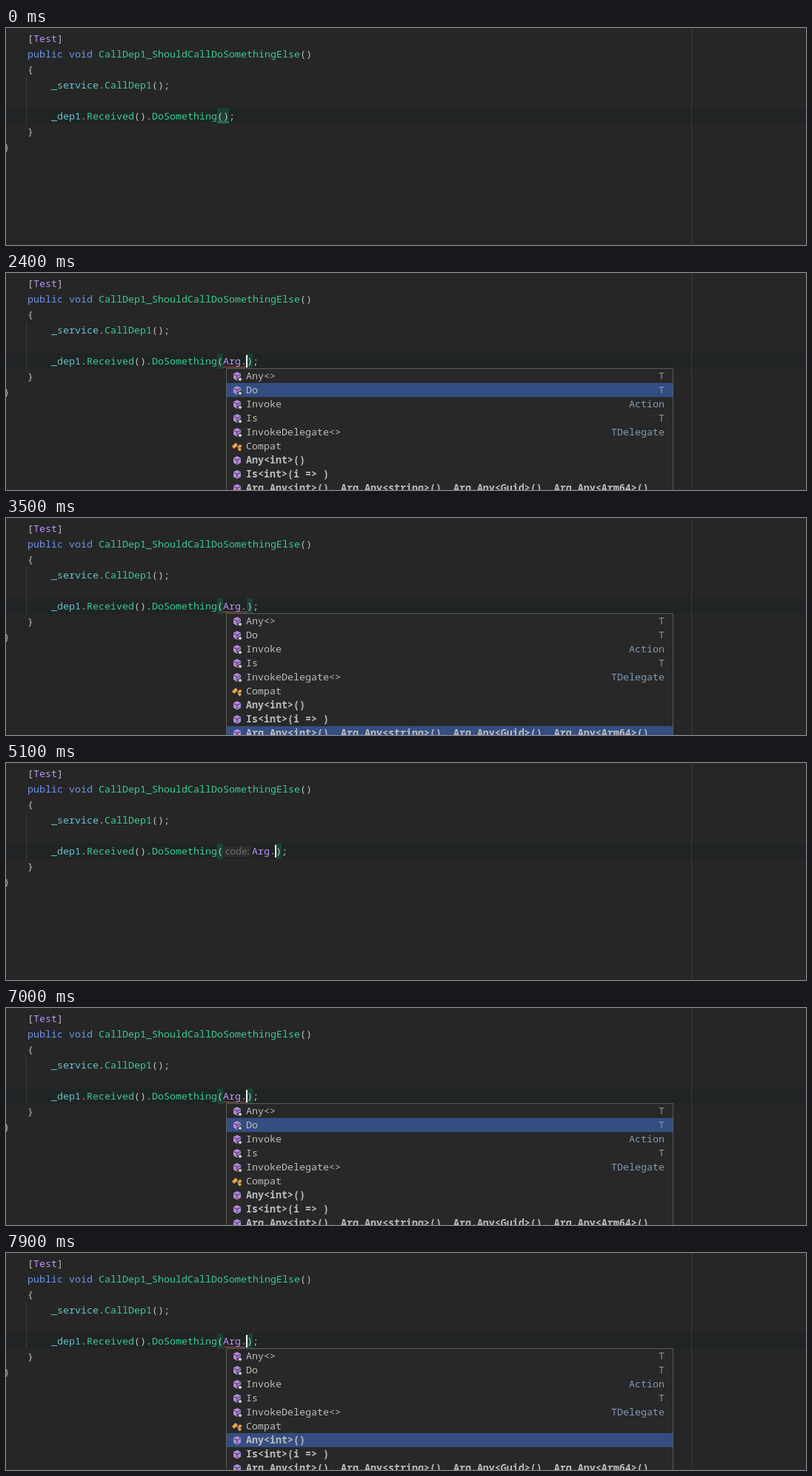
Write an HTML page with a canvas that moves like this. It is 1080 by 294 pixels and loops after 8 s.

```html
<!DOCTYPE html>
<html lang="en">
<head>
<meta charset="utf-8">
<title>Code completion</title>
<style>
  html, body { margin: 0; width: 100%; height: 100%; overflow: hidden; background: #262626; }
  canvas { display: block; }
</style>
</head>
<body>
<canvas id="stage" width="1080" height="294"></canvas>
<script>
const ctx = document.getElementById('stage').getContext('2d');
const LOOP = 8000, CELL = 8, ROW = 19;
const MONO = '13.333px "Noto Sans Mono", "DejaVu Sans Mono", monospace';
const HINT = '13px "Open Sans", sans-serif';
const C = {
  text: '#bdbdbd', key: '#6c95eb', method: '#39cc8f', type: '#c191ff', field: '#66c3cc',
  match: '#d7b56d', detail: '#7f9ab8', orange: '#f0a44b', blue: '#5aa9f0', purple: '#b389d9'
};

const CALLS = '#code:Arg.Any<int>(), #name:Arg.Any<string>(), #id:Arg.Any<Guid>(), #architecture:Arg.Any<Arm64>()';
const CALLS_BARE = CALLS.replace(/#\w+:/g, '');

// Each entry: icon kind, label, detail
const MEMBERS = [
  ['method+', 'Any<>', 'T'], ['method+', 'Do', 'T'], ['method+', 'Invoke', 'Action'],
  ['method+', 'Is', 'T'], ['method+', 'InvokeDelegate<>', 'TDelegate'], ['class', 'Compat'],
  ['method', 'Any<int>()'], ['method', 'Is<int>(i => )'], ['method', CALLS_BARE]
];
const TYPES = {
  A: 'class+ Arg,abstract Array,class Action,class Attribute,struct ArgIterator,class Activator,class AppDomain,class AppContext,class ArgumentException',
  Ar: 'class+ Arg,abstract Array,struct ArgIterator,class ArgumentException,class ArithmeticException,abstract ArmBase,struct ArraySegment<>,class ArgumentNullException,class ArrayTypeMismatchException',
  Arg: 'class+ Arg,struct ArgIterator,class ArgumentException,class ArgumentNullException,class ArgumentOutOfRangeException,class InvalidEnumArgumentException,class DuplicateWaitObjectException,class CultureNotFoundException,class DecoderFallbackException'
};

// Value of the last [time, value] pair already reached
const step = (t, ...pairs) => pairs.filter(p => p[0] <= t).pop()[1];
const within = (t, ...spans) => spans.some(([a, b]) => t >= a && t < b);

function box(x, y, w, h, color) {
  ctx.fillStyle = color;
  ctx.fillRect(x, y, w, h);
}

function write(str, x, y, color = C.text, font = MONO) {
  ctx.font = font;
  ctx.fillStyle = color;
  ctx.fillText(str, x, y);
}

function shape(color, ...points) {
  ctx.fillStyle = color;
  ctx.beginPath();
  points.forEach(([x, y]) => ctx.lineTo(x, y));
  ctx.fill();
}

function stroke(color, ...points) {
  ctx.strokeStyle = color;
  ctx.lineWidth = 1;
  ctx.beginPath();
  points.forEach(([x, y]) => ctx.lineTo(x, y));
  ctx.stroke();
}

function tint(word) {
  if (/^(public|void|int|string)$/.test(word)) return C.key;
  if (/^(Test|Arg|Guid|Arm64)$/.test(word)) return C.type;
  if (/^_/.test(word)) return C.field;
  return /^\w/.test(word) ? C.method : C.text;
}

function hint(label, x, y) {
  ctx.font = HINT;
  const w = Math.round(ctx.measureText(label).width) + 6;
  ctx.fillStyle = '#2b2d2d';
  ctx.beginPath();
  ctx.roundRect(x + 1, y - 12, w - 2, 15, 3);
  ctx.fill();
  write(label, x + 3, y, '#757575', HINT);
  return w;
}

// Draws coloured code and returns the x where it ends
function code(str, x, y, plain) {
  for (const part of str.split(/(#\w+:|\w+)/)) {
    if (part[0] === '#') {
      x += hint(part.slice(1), x, y);
    } else {
      write(part, x, y, plain ? C.text : tint(part));
      x += part.length * CELL;
    }
  }
  return x;
}

function squiggle(x0, x1, color) {
  const points = [];
  for (let x = x0; x <= x1; x += 2) points.push([x, (x - x0) % 4 ? 126.5 : 128.5]);
  stroke(color, ...points);
}

function icon(kind, x, y) {
  const at = (...points) => points.map(([a, b]) => [x + a, y + b]);
  if (kind.startsWith('method')) {
    shape(C.purple, ...at([0, -6], [5, -3.5], [5, 3], [0, 6], [-5, 3], [-5, -3.5]));
    stroke('#3a2f48', ...at([-4.5, -2.5], [0, -0.5], [4.5, -2.5]));
    stroke('#3a2f48', ...at([0, -0.5], [0, 5]));
  } else if (kind === 'struct') {
    box(x - 5, y - 4, 5, 4, C.blue);
    box(x + 1, y - 4, 4, 3, C.blue);
    box(x - 5, y + 1, 3, 4, C.blue);
    box(x - 1, y, 6, 5, C.blue);
    box(x - 1, y + 1, 2, 2, '#28405a');
  } else {
    stroke('#a8896a', ...at([-1, 0.5], [1.5, 0.5], [1.5, 4], [4, 4]));
    shape(C.orange, ...at([-7, 0], [-2, -5], [1, -2], [-4, 3]));
    shape(C.orange, ...at([1, 0], [4, -3], [6.5, -0.5], [3.5, 2.5]));
    shape(C.orange, ...at([1, 4], [3.5, 1.5], [6, 4], [3.5, 6.5]));
    if (kind === 'abstract') {
      box(x - 7, y - 6, 6, 6, '#282828');
      write('A', x - 7, y, '#b8b8b8', '8px "Noto Sans Mono", monospace');
    }
  }
  if (kind.endsWith('+')) {
    shape('#282828', ...at([4, 0], [8, 4], [4, 8], [0, 4]));
    shape('#d5d5d5', ...at([4, 1.5], [6.5, 4], [4, 6.5], [1.5, 4]));
  }
}

function popup(x, right, items, selected, prefix = '') {
  box(x, 129, right - x, 165, '#5a5a5a');
  box(x + 1, 130, right - x - 2, 164, '#282828');
  items.forEach(([kind, label, detail], i) => {
    const y = 130 + i * ROW;
    if (i === selected) box(x + 1, y, right - x - 2, ROW, '#344e82');
    icon(kind, x + 15, y + 10);
    const font = kind === 'method' ? 'bold ' + MONO : MONO;
    const hit = prefix && label.startsWith(prefix) ? prefix.length : 0;
    write(label.slice(0, hit), x + 27, y + 14, C.match, font);
    write(label.slice(hit), x + 27 + hit * CELL, y + 14, C.text, font);
    if (detail) write(detail, right - 12 - detail.length * CELL, y + 14, C.detail);
  });
}

function typePopup(prefix) {
  const right = prefix === 'Arg' ? 915 : 746;
  popup(265, right, TYPES[prefix].split(',').map(s => s.split(' ')), 0, prefix);
  box(right - 11, 130, 10, 28, 'rgba(125,125,125,.4)');
}

function draw(t) {
  box(0, 0, 1080, 294, '#262626');
  box(0, 109, 1080, 21, '#202424');
  box(925, 0, 1, 294, '#393939');
  box(27, 67, 1, 63, '#3b3b3b');

  code('[Test]', 29, 19);
  code('public void CallDep1_ShouldCallDoSomethingElse()', 29, 40);
  code('{', 29, 61);
  code('_service.CallDep1();', 61, 82);
  code('}', 29, 145);
  code('}', -3, 166);

  const arg = step(t, [0, ''], [900, 'A'], [1200, 'Ar'], [1400, 'Arg'], [1600, 'Arg.'],
    [3700, CALLS_BARE], [3800, CALLS], [5100, '#code:Arg.'], [5200, 'Arg.']);
  const matched = !within(t, [900, 1600]);
  if (matched) box(285, 109, 8, 21, '#1a4237');
  code('_dep1.Received().DoSomething(', 61, 124);
  const end = code(arg, 293, 124, within(t, [900, 1900], [3700, 3800]));
  if (matched) box(end, 109, 8, 21, '#1a4237');
  code(');', end, 124);

  if (t < 900) squiggle(285, 301, '#4fa97a');
  if (within(t, [1900, 3700], [5300, LOOP])) squiggle(293, 325, '#d1675a');
  if (within(t, [300, 3200], [3700, 6100], [6700, 7200], [7700, LOOP])) box(end - 1, 111, 2, 17, '#fff');

  if (within(t, [1000, 1600])) typePopup(arg);
  if (within(t, [1800, 3700], [5900, LOOP])) {
    popup(297, 901, MEMBERS, step(t, [1800, 0], [2400, 1], [2600, 2], [2700, 3], [2900, 4],
      [3000, 5], [3200, 6], [3300, 7], [3500, 8], [5900, 0], [6900, 1], [7200, 2],
      [7400, 3], [7500, 4], [7700, 5], [7900, 6]));
  }
  // Documentation panel flashes beside the list
  if (within(t, [6900, 7000])) {
    box(901, 129, 179, 42, '#5a5a5a');
    box(902, 130, 178, 40, '#282828');
  }
}

const start = performance.now();
function frame() {
  draw((performance.now() - start) % LOOP);
  requestAnimationFrame(frame);
}
frame();
</script>
</body>
</html>
```
